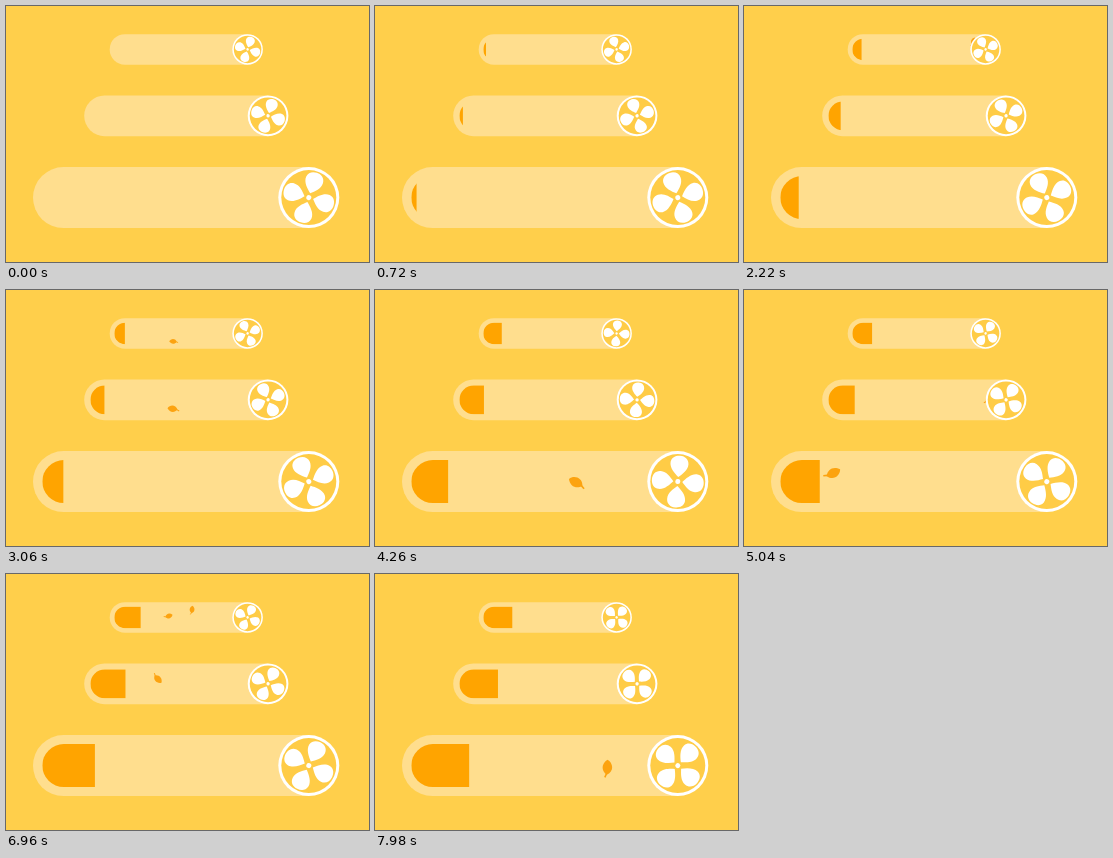
These frames come from a looping animation (363x256 px, 8 s). An HTML page with a canvas:

```html
<!DOCTYPE html>
<html lang="en">
<head>
<meta charset="utf-8">
<title>Leaf loading bars</title>
<style>
  html, body { margin: 0; width: 100%; height: 100%; overflow: hidden; background: #ffcf4b; }
  canvas { display: block; width: 363px; height: 256px; }
</style>
</head>
<body>
<canvas id="stage"></canvas>
<script>
const W = 363, H = 256, LOOP = 8000, STEP = 60;
const BACK = '#ffcf4b', TRACK = '#ffde8e', FILL = '#ffa400', LEAF = '#fca310';
const RAD = Math.PI / 180;

const canvas = document.getElementById('stage');
const ctx = canvas.getContext('2d');
const dpr = window.devicePixelRatio || 1;
canvas.width = W * dpr;
canvas.height = H * dpr;

// Each leaf: start time, phase of its wave, first angle, spin direction.
const bars = [
  { x: 103.7, y: 43.4, scale: 1 / 2, leaves: [
    [1931, 301, 31, 1], [5755, 70, 172, -1], [6078, 118, 200, 1]] },
  { x: 78.2, y: 109.8, scale: 2 / 3, leaves: [
    [1971, 273, 48, 1], [4743, 243, 50, 1], [4990, 112, 111, -1], [5707, 221, 219, 1]] },
  { x: 27, y: 191.6, scale: 1, leaves: [
    [3452, 167, 277, -1], [5089, 139, 149, 1], [7377, 131, 281, -1]] }
];

// Moments at which the progress grows by one percent.
const ticks = [300, 540, 780, 1020, 1200, 1380, 1980, 2580, 3120, 3360, 3600,
  3840, 4020, 4200, 4740, 5160, 5400, 5640, 6120, 6420, 7080, 7740];
const PERCENT = 2.63;

const FLOAT_TIME = 1800, SPIN_TIME = 1200;
const FAN_X = 275.8, FAN_R = 30.5;

function disc(x, y, r, color) {
  ctx.fillStyle = color;
  ctx.beginPath();
  ctx.arc(x, y, r, 0, 2 * Math.PI);
  ctx.fill();
}

// A box whose left end is a half circle.
function capsule(left, r, right) {
  ctx.beginPath();
  ctx.arc(left + r, 0, r, Math.PI / 2, Math.PI * 1.5);
  ctx.lineTo(right, -r);
  ctx.lineTo(right, r);
  ctx.closePath();
}

function drawLeaf([start, phase, angle, spin], t) {
  const age = t - start, part = age / FLOAT_TIME;
  if (part < 0 || part > 1) return;
  ctx.save();
  ctx.translate(293 - 263 * part, 17 * Math.sin((phase - 360 * part) * RAD));
  ctx.rotate((angle + spin * 360 * age / SPIN_TIME) * RAD);
  ctx.fillStyle = ctx.strokeStyle = LEAF;
  ctx.beginPath();
  ctx.moveTo(-9, 1);
  ctx.bezierCurveTo(-7, -5, 1, -8, 6, -1);
  ctx.bezierCurveTo(3, 5.5, -4, 6.5, -9, 1);
  ctx.fill();
  ctx.lineWidth = 1.6;
  ctx.beginPath();
  ctx.moveTo(5, -0.5);
  ctx.lineTo(9, 0.5);
  ctx.stroke();
  ctx.restore();
}

function drawProgress(count) {
  if (!count) return;
  ctx.save();
  capsule(9.3, 21.5, 120);
  ctx.clip();
  ctx.fillStyle = FILL;
  ctx.fillRect(9.3, -22, count * PERCENT, 44);
  ctx.restore();
}

function drawFan(angle) {
  ctx.save();
  ctx.translate(FAN_X, 0);
  disc(0, 0, FAN_R, '#fff');
  disc(0, 0, FAN_R - 3, '#ffcc46');
  ctx.rotate(angle * RAD);
  ctx.fillStyle = '#fff';
  for (let i = 0; i < 4; i++) {
    ctx.beginPath();
    ctx.moveTo(0, -4.5);
    ctx.bezierCurveTo(-4, -8, -9.5, -13, -9, -19);
    ctx.bezierCurveTo(-8.5, -24, -4, -26, 0, -26);
    ctx.bezierCurveTo(5, -26, 9, -23, 9, -18);
    ctx.bezierCurveTo(9, -12, 4, -8, 0, -4.5);
    ctx.fill();
    ctx.rotate(Math.PI / 2);
  }
  disc(0, 0, 2.5, '#fff');
  ctx.restore();
}

function draw(t) {
  ctx.setTransform(dpr, 0, 0, dpr, 0, 0);
  ctx.fillStyle = BACK;
  ctx.fillRect(0, 0, W, H);
  const count = ticks.filter(tick => tick <= t).length;
  const angle = 18 - 25.53 * t / STEP;
  for (const bar of bars) {
    ctx.save();
    ctx.translate(bar.x, bar.y);
    ctx.scale(bar.scale, bar.scale);
    capsule(0, FAN_R, FAN_X);
    ctx.fillStyle = TRACK;
    ctx.fill();
    bar.leaves.forEach(leaf => drawLeaf(leaf, t));
    drawProgress(count);
    drawFan(angle);
    ctx.restore();
  }
}

function frame() {
  const t = performance.now() % LOOP;
  draw(Math.floor(t / STEP) * STEP);
  requestAnimationFrame(frame);
}
frame();
</script>
</body>
</html>
```
